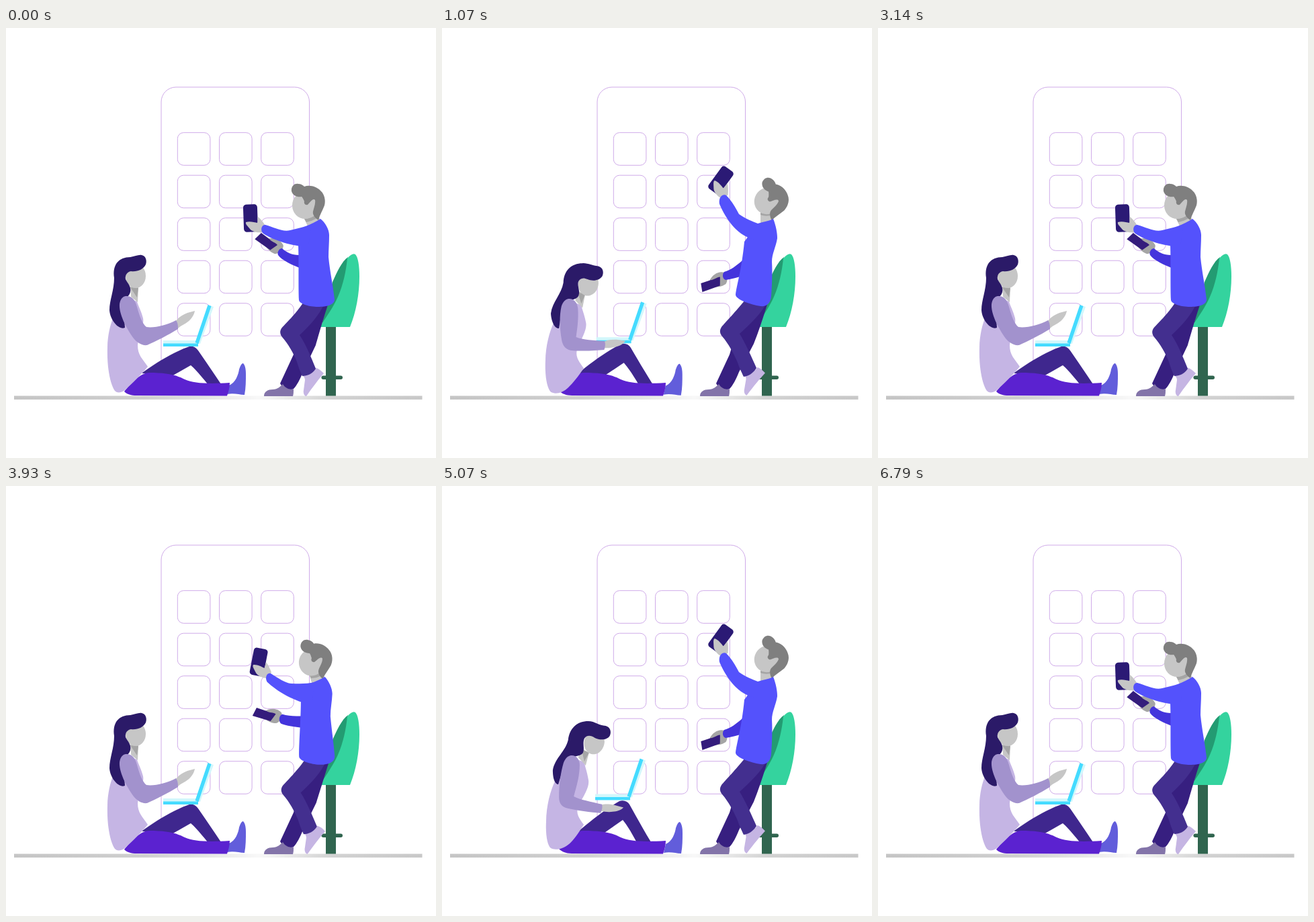
Write an HTML page that moves like this. It is 640 px wide and 640 px high and loops after 7210 ms.

```html
<!DOCTYPE html>
<html lang="en">
<head>
<meta charset="utf-8">
<title>Two people building an app</title>
<style>
html, body { margin: 0; width: 100%; height: 100%; overflow: hidden; background: #fff; }
svg { display: block; width: 100vw; height: 100vh; }
</style>
</head>
<body>
<svg id="stage" viewBox="0 0 640 640">
  <defs>
    <linearGradient id="floor">
      <stop offset="0" stop-color="#c5c5c5"/>
      <stop offset=".32" stop-color="#cfcfcf"/>
      <stop offset=".6" stop-color="#f8f8f8"/>
      <stop offset=".78" stop-color="#d2d2d2"/>
      <stop offset="1" stop-color="#c8c8c8"/>
    </linearGradient>
  </defs>
  <g id="app" fill="none" stroke="#cfaae9" stroke-width="1">
    <path d="M231 515V110A22 22 0 0 1 253 88H429.500A22 22 0 0 1 451.500 110V440"/>
  </g>
  <rect x="12" y="547.500" width="607.500" height="5.500" fill="url(#floor)"/>
  <g id="stool">
    <path fill="#239b72" d="M509 341C500 347 492 364 486 378L470 440L500 420Z"/>
    <path fill="#34d39e" d="M467 445C478 428 488 414 494 400C502 382 506 362 508 343C513 337 517 335 520 337C524 341 526 354 526 370C526 396 521 423 512 445Z"/>
    <rect x="476" y="445" width="15" height="102.500" fill="#30654f"/>
    <rect x="469.500" y="517.500" width="31.500" height="5.500" rx="2.700" fill="#30654f"/>
  </g>
  <g id="man"></g>
  <g id="woman"></g>
</svg>
<script>
const NS = 'http://www.w3.org/2000/svg';
const $ = id => document.getElementById(id);
const LOOP = 7210, FRAMES = 101, STEP = 1000 / 14, CYCLE = 3600;

function add(parent, tag, attrs) {
  const el = document.createElementNS(NS, tag);
  for (const k in attrs) el.setAttribute(k, attrs[k]);
  parent.appendChild(el);
  return el;
}

for (let r = 0; r < 5; r++)
  for (let c = 0; c < 3; c++)
    add($('app'), 'rect', { x: 255.3 + c * 62.2, y: 155.7 + r * 63.5, width: 48.6, height: 48.6, rx: 9 });

// Blend two or three poses; the third sits between the ends.
function mix(u, a, b, mid) {
  if (!mid) return a.map((v, i) => v + (b[i] - v) * u);
  const wa = (1 - u) * (1 - 2 * u), wm = 4 * u * (1 - u), wb = u * (2 * u - 1);
  return a.map((v, i) => v * wa + mid[i] * wm + b[i] * wb);
}

const NUM = /-?\d+(\.\d+)?/g;
const nums = d => d.match(NUM).map(Number);

function morph(parent, fill, a, b, mid) {
  const el = add(parent, 'path', { fill, d: a });
  const poses = [a, b, mid].map(d => d && nums(d));
  return u => {
    const vals = mix(u, ...poses);
    let i = 0;
    el.setAttribute('d', a.replace(NUM, () => vals[i++].toFixed(2)));
  };
}

// Each pose is [x, y, angle] of the pivot; the first one is as drawn.
function rigid(parent, a, b, mid, draw) {
  const g = add(parent, 'g', {});
  draw(g);
  return u => {
    const [x, y, r] = mix(u, a, b, mid);
    g.setAttribute('transform', `translate(${x} ${y}) rotate(${r}) translate(${-a[0]} ${-a[1]})`);
  };
}

const shape = (g, fill, d) => add(g, 'path', { fill, d });
const SKIN = '#c6c6c6', SHADE = '#a5a5a5';

function buildMan(g) {
  const parts = [];
  const part = (...a) => parts.push(morph(g, ...a));
  const solid = (...a) => parts.push(rigid(g, ...a));

  part('#371f80',
    'M447 409L480 409C470 440 466 455 461 472L442 512C438 522 433 532 428 537C420 541 411 535 408 529L428 486Z',
    'M452 405L486 405C476 438 470 455 464 470L442 512C438 522 433 532 428 537C420 541 411 535 408 529L428 486Z');
  shape(g, '#8374a9', 'M384 548C384 541 390 538 397 538C404 538 409 533 412 530C416 537 424 539 428 537C428 541 428 545 427 548Z');
  solid([458, 512, 0], [466, 511, 2], null, s =>
    shape(s, '#c5b5e3', 'M461 506C466 507 470 511 473 514C466 522 456 535 447 548C444 548 442 543 443 539L445 524C445 521 443 518 441 517C449 518 457 514 461 506Z'));
  part('#432f8f',
    'M442 409C432 425 416 440 410 447C407 452 408 456 411 460C420 470 428 484 433 497C436 507 439 514 441 518C449 518 457 514 461 507C454 490 446 470 437 457C452 443 466 428 474 410Z',
    'M451 405C438 421 422 438 416 445C413 450 413 454 417 459C426 469 435 486 440 498C443 507 447 515 449 519C457 518 464 513 468 506C461 490 452 470 443 455C458 441 476 425 484 407Z');

  solid([387, 318, 33], [400, 381.5, -22], [385, 357, 0], s => {
    const hold = add(s, 'g', { transform: 'translate(2 -39)' });
    shape(hold, SHADE, 'M385 352C392 344 404 343 410 348C413 354 411 362 406 365C398 367 392 364 388 363Z');
    shape(hold, '#341c7c', 'M372 350L387 351C393 353 398 350 402 352L397 364L369 363Z');
  });
  part('#4434dc',
    'M411 328C417 334 426 338 436 338L444 338L444 360C424 352 411 346 405 338C403 333 407 328 411 328Z',
    'M420 363C430 360 438 354 447 346L458 342L454 367C437 372 430 374 422 375C417 373 417 366 420 363Z',
    'M413 349C422 349 432 347 441 345L449 344L449 362C432 363 422 365 413 364C408 361 408 351 413 349Z');

  part(SKIN,
    'M444 284L463 276L468 286C462 290 455 293 449 295Z',
    'M474 276L492 272L493 286C487 290 480 293 474 293Z');
  part(SHADE,
    'M444 284C452 284 460 280 463 276L464 282C458 286 452 288 447 289Z',
    'M474 275C482 277 489 275 492 272L492 277C486 281 480 280 474 278Z');
  solid([445, 263, 0], [484.5, 256.5, 29], [464.5, 260, 16], s => {
    add(s, 'ellipse', { cx: 445, cy: 264, rx: 19, ry: 20, fill: SKIN });
    shape(s, '#7f7f7f', 'M425 243C424 235 430 231 435 232C439 232 442 234 444 236C452 233 462 236 468 242C474 247 476 256 474 264C471 272 467 278 465 286C460 283 456 278 457 273C458 268 461 262 460 256C457 252 452 260 449 263C446 264 443 262 444 258C443 255 441 252 440 251C434 252 427 250 425 243Z');
  });

  part('#5452fc',
    'M444 296C454 292 462 288 468 284C475 289 481 300 481 308C481 320 480 330 480 341C482 362 487 385 489 404C489 412 478 415 464 415C452 415 437 411 436 405C435 385 436 350 435 322Z',
    'M470 291C480 288 488 287 493 284C497 294 499 305 499 313C497 326 491 336 491 348C492 365 491 385 490 399C489 410 483 415 474 414C460 412 437 404 437 397C438 385 446 360 450 318Z');
  solid([364, 283, 0], [415, 226.5, 38], [388, 246.5, 23], s => {
    add(s, 'rect', { x: 353.5, y: 262.5, width: 21, height: 41, rx: 4.5, fill: '#2b1a75', transform: 'rotate(-2 364 283)' });
    shape(s, SKIN, 'M357 289C362 287 370 289 374 290C375 288 374 283 375 281C380 285 384 291 386 294L381 304C374 305 366 303 363 299C360 295 356 292 357 289Z');
  });
  part('#5452fc',
    'M386 293C400 297 412 304 423 301C434 298 445 296 455 292L450 325C430 326 400 317 383 306C378 302 380 292 386 293Z',
    'M423 249C432 258 437 268 442 277C452 284 462 288 470 291L470 316C440 312 422 283 413 262C411 252 418 246 423 249Z',
    'M403 268C413 277 420 284 428 288C440 291 452 293 463 292L460 324C432 318 407 296 395 280C392 271 398 265 403 268Z');
  return u => parts.forEach(p => p(u));
}

function buildWoman(g) {
  const parts = [];
  const part = (...a) => parts.push(morph(...a));
  const solid = (...a) => parts.push(rigid(g, ...a));

  part(g, '#3f278e',
    'M203 513C225 497 250 482 273 474C279 473 283 476 286 480C297 496 308 512 320 530L301 531C292 520 284 510 275 502L247 518C235 516 220 515 203 514Z',
    'M203 514C225 495 245 480 264 469C270 467 276 469 279 474C289 492 300 512 311 530L290 531C283 518 277 507 269 497L239 518C230 517 218 515 203 515Z');
  solid([344, 530, 0], [345, 531, 0], null, s =>
    shape(s, '#625ddb', 'M332 532C342 528 346 515 347 508C349 502 351 499 353 499C356 502 357 508 357 515C357 525 357 535 355 546C347 546 340 543 329 545Z'));
  part(g, '#5b22d0',
    'M176 541C185 530 200 513 213 513C240 513 255 517 266 523C280 529 300 530 333 528C333 535 331 542 329 547.500L195 547C186 547 180 545 176 541Z',
    'M174 540C183 530 197 513 210 513C240 513 255 517 266 523C280 529 300 530 333 528C333 535 331 542 329 547.500L193 547C184 547 178 544 174 540Z');
  solid([260, 470, 0], [254, 463.5, 0], null, s => {
    shape(s, '#d2f7fb', 'M234 465H284L303 413L309 415L289 470H234Z');
    shape(s, '#44dbff', 'M234 469.500H286V474H234ZM300.500 412L305.500 414L286.500 470L281.500 468Z');
  });

  const body = add(g, 'g', {});
  part(body, '#c5b5e4',
    'M181 402C165 412 152 440 151 475C150 505 155 530 162 540C167 545 175 542 181 535C190 527 202 515 211 504C203 492 196 487 196 472C198 455 206 443 204 432C201 420 196 412 195 407Z',
    'M196 405C178 415 156 450 155 500C154 520 157 535 162 539C170 543 182 539 190 532C198 525 205 513 211 504C203 493 199 487 203 476C213 458 220 447 218 437C216 425 213 418 212 411Z');
  part(body, SKIN,
    'M185 382L197 386L196 408L186 400Z',
    'M207 390L219 397L214 416L203 404Z');
  part(body, SHADE,
    'M185 386L197 387L195 401Z',
    'M208 392L219 397L212 410Z');
  parts.push(rigid(body, [193, 369, 0], [227, 381.5, 14], null, s =>
    add(s, 'ellipse', { cx: 193, cy: 369, rx: 15, ry: 18, fill: SKIN })));
  part(body, '#2b1a68',
    'M161 372C158 352 168 341 185 341C192 340 197 337 202 338C208 339 210 346 208 352C204 360 195 363 186 362C180 363 177 368 178 374C181 380 187 385 185 393C183 402 174 402 170 409C168 420 177 432 177 446C168 450 155 435 154 420C154 405 161 390 161 372Z',
    'M188 378C190 360 202 350 218 350C228 350 234 357 244 357C251 359 253 366 250 372C246 378 236 379 228 375C221 370 215 371 212 376C209 384 213 390 210 397C206 404 190 401 184 410C180 422 176 434 173 444C166 443 165 430 165 423C168 405 184 395 188 378Z');
  part(body, SKIN,
    'M252 437C257 430 263 427 270 424L281 421C280 427 276 433 271 437C266 441 260 443 256 447Z',
    'M236 475C243 473 250 474 256 475L270 479C266 483 260 485 254 485C248 486 242 485 236 484Z');
  part(body, '#a292cd',
    'M178 399C186 398 192 403 195 415C199 430 203 440 209 445C220 447 240 442 253 435C256 439 256 444 256 448C243 456 222 467 210 472C202 473 195 468 190 462C178 445 168 425 169 411C170 404 173 400 178 399Z',
    'M192 401C199 400 205 406 205 415C205 430 201 445 196 462C205 467 222 470 238 474C239 478 238 483 236 487C222 486 200 483 184 479C176 476 174 470 174 463C174 445 177 425 181 412C184 405 187 402 192 401Z');
  return u => {
    parts.forEach(p => p(u));
    body.setAttribute('transform', `translate(0 ${13 * u * (1 - u)})`);
  };
}

// cubic-bezier(k, 0, 1 - k, 1)
function ease(x, k) {
  if (x <= 0 || x >= 1) return x <= 0 ? 0 : 1;
  let lo = 0, hi = 1;
  for (let i = 0; i < 24; i++) {
    const s = (lo + hi) / 2, r = 1 - s;
    if (3 * r * r * s * k + 3 * r * s * s * (1 - k) + s * s * s < x) lo = s; else hi = s;
  }
  return lo * lo * (3 - 2 * lo);
}

// start, end, easing: there, then back
const MOVES = {
  man: [[0, 860, .55], [1600, 2780, .6]],
  woman: [[290, 1590, .6], [2370, 3160, .55]]
};

function amount(moves, t) {
  const [go, back] = moves.map(([s, e, k]) => ease((t - s) / (e - s), k));
  return go - back;
}

const poseMan = buildMan($('man')), poseWoman = buildWoman($('woman'));
const start = performance.now();

function tick(now) {
  const t = Math.max(0, now - start) % LOOP;
  const n = Math.floor((t + 4) / LOOP * FRAMES) % FRAMES;
  const phase = n * STEP % CYCLE;
  poseMan(amount(MOVES.man, phase));
  poseWoman(amount(MOVES.woman, phase));
  requestAnimationFrame(tick);
}
tick(start);
</script>
</body>
</html>
```
